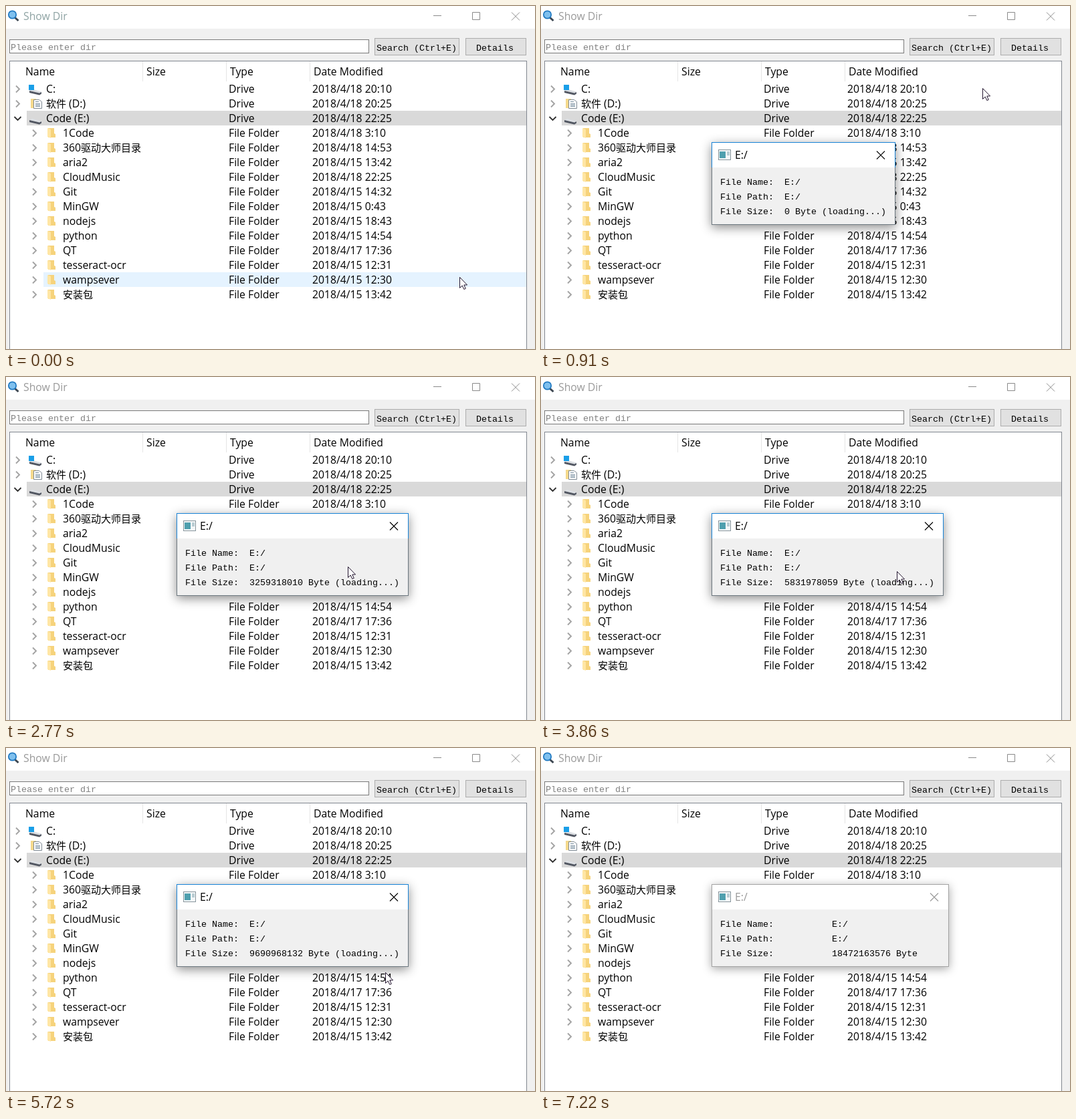
An HTML page that plays this animation: 791x514 px, repeating every 7.37 s.

```html
<!DOCTYPE html>
<html lang="en">
<head>
<meta charset="utf-8">
<title>Show Dir</title>
<style>
html, body { margin: 0; width: 100%; height: 100%; overflow: hidden; background: #f0f0f0; }
svg { display: block; width: 791px; height: 514px; }
text { white-space: pre; }
.ui { font: 15.75px "Open Sans", "Noto Sans", "Noto Sans CJK SC", sans-serif; }
.cjk { font: 15px "Noto Sans CJK SC", "Noto Sans CJK", "Noto Sans CJK JP", sans-serif; }
.mono { font: 13.333px "Liberation Mono", monospace; }
#shade { filter: drop-shadow(0 4px 8px rgba(0, 0, 0, .45)); }
.idle #shade { filter: drop-shadow(0 3px 7px rgba(0, 0, 0, .35)); }
</style>
</head>
<body>
<script>
const LOOP = 7370, TICK = 77;
const NS = 'http://www.w3.org/2000/svg';

function set(el, attrs) {
  for (const k in attrs) el.setAttribute(k, attrs[k]);
  return el;
}
const add = (parent, tag, attrs = {}) =>
  parent.appendChild(set(document.createElementNS(NS, tag), attrs));
const rect = (p, x, y, width, height, fill, more) =>
  add(p, 'rect', { x, y, width, height, fill, ...more });
const frame = (p, x, y, w, h, fill, stroke) =>
  rect(p, x + .5, y + .5, w - 1, h - 1, fill, { stroke });
const path = (p, d, fill, stroke = 'none', width = 1) =>
  add(p, 'path', { d, fill, stroke, 'stroke-width': width });
const group = (p, x, y) => add(p, 'g', { transform: `translate(${x} ${y})` });

function label(p, x, y, str, cls = 'ui', fill = '#000') {
  const el = add(p, 'text', { x, y, class: cls, fill });
  for (const run of str.split(/([\u4e00-\u9fff]+)/).filter(Boolean)) {
    const cjk = /[\u4e00-\u9fff]/.test(run);
    add(el, 'tspan', cjk ? { class: 'cjk' } : {}).textContent = run;
  }
  return el;
}

const svg = add(document.body, 'svg', { viewBox: '0 0 791 514' });
rect(svg, 0, 0, 791, 514, '#f0f0f0');

// title bar
rect(svg, 0, 0, 791, 34, '#fff');
path(svg, 'M13 17L18.5 22', 'none', '#3c4650', 3);
add(svg, 'circle', { cx: 9.5, cy: 13, r: 5.7, fill: '#7fc0ee', stroke: '#1f78c0', 'stroke-width': 1.7 });
const title = label(svg, 26, 21, 'Show Dir');
path(svg, 'M639 14.5H651M756 9.5L768 21.5M768 9.5L756 21.5', 'none', '#8a8a8a');
const maxIcon = path(svg, 'M697.5 9.5H708.5V20.5H697.5Z', 'none');

// search row
frame(svg, 5, 50, 538, 21, '#fff', '#7a7a7a');
label(svg, 7, 66, 'Please enter dir', 'mono', '#808080');
frame(svg, 551, 48, 127, 26, '#e1e1e1', '#adadad');
label(svg, 554, 67, 'Search (Ctrl+E)', 'mono');
const details = frame(svg, 687, 48, 91, 26);
label(svg, 703, 67, 'Details', 'mono');

// file tree
const TOP = 113, ROW = 22, SELECTED = 2, DRIVES = 3;
frame(svg, 5, 82, 774, 440, '#fff', '#828790');
['Name', 'Size', 'Type', 'Date Modified'].forEach((s, i) => {
  label(svg, i ? 85 + 125 * i : 29, 104, s);
  if (i) rect(svg, 79 + 125 * i, 83, 1, 30, '#e5e5e5');
});
rect(svg, 31, TOP + ROW * SELECTED, 747, ROW, '#d9d9d9');
const hover = rect(svg, 56, 0, 722, ROW, '#e5f3ff');

const rows = [
  ['C:', '18 20:10'], ['软件 (D:)', '18 20:25'], ['Code (E:)', '18 22:25'],
  ['1Code', '18 3:10'], ['360驱动大师目录', '18 14:53'], ['aria2', '15 13:42'],
  ['CloudMusic', '18 22:25'], ['Git', '15 14:32'], ['MinGW', '15 0:43'],
  ['nodejs', '15 18:43'], ['python', '15 14:54'], ['QT', '17 17:36'],
  ['tesseract-ocr', '15 12:31'], ['wampsever', '15 12:30'], ['安装包', '15 13:42']
];

function drive(g) {
  path(g, 'M35 14L39 11.5L53 15.5V17L50 18Z', '#dcdfe3');
  path(g, 'M35 14L50 17.5L53 16V18.5L50 20.5L35 17Z', '#525762');
}
function folder(g) {
  path(g, 'M63 4H72V12L74 13V18H63Z', '#f6d37c');
  path(g, 'M62 4L67 6V19L62 17Z', '#ffe6a4');
}
function docFolder(g) {
  path(g, 'M37 4H45V18H37Z', '#f5d98c');
  path(g, 'M41.5 5.5H49.5L53.5 8.5V18.5H41.5Z', '#fff', '#7f8a94');
  path(g, 'M44 8.5H49M44 11.5H51M44 13.5H51M44 15.5H51', 'none', '#6f8799');
}

rows.forEach(([name, date], i) => {
  const g = group(svg, 0, TOP + ROW * i), isDrive = i < DRIVES, x = isDrive ? 15 : 40;
  if (i === SELECTED) path(g, 'M12.5 9L17.5 14L22.5 9', 'none', '#303030', 1.8);
  else path(g, `M${x} 6.5L${x + 5} 11.5L${x} 16.5`, 'none', '#a3a3a3', 1.9);
  (i === 1 ? docFolder : isDrive ? drive : folder)(g);
  if (i === 0) rect(g, 34, 5, 8, 8, '#1a9fe8');
  label(g, isDrive ? 60 : 85, 17, name);
  label(g, 333, 17, isDrive ? 'Drive' : 'File Folder');
  label(g, 458, 17, '2018/4/' + date);
});

// dialog
const dialog = group(svg, 255, 204);
const shade = rect(dialog, 0, 0, 0, 124, '#f0f0f0', { id: 'shade' });
const body = frame(dialog, 0, 0, 1, 124, '#f0f0f0');
const bar = frame(dialog, 0, 0, 1, 38, '#fff');
const barEdge = rect(dialog, 1, 37, 0, 1, '#fff');
frame(dialog, 10, 11, 19, 16, '#f4f7f8', '#87959c');
rect(dialog, 12, 14, 9, 10, '#4f9fae');
rect(dialog, 23, 14, 4, 6, '#b9cdd3');
const dialogTitle = label(dialog, 35, 25, 'E:/');
const cross = path(dialog, 'M-6 13.5L6 25.5M6 13.5L-6 25.5', 'none', '#000', 1.1);
const values = ['Name', 'Path', 'Size'].map((s, i) => {
  label(dialog, 13, 64 + ROW * i, `File ${s}:`, 'mono');
  return label(dialog, 0, 64 + ROW * i, 'E:/', 'mono');
});

const cursor = path(svg, 'M.5 .5V16.5L4.2 13L6.8 18.5L9.3 17.5L6.8 12H11.6Z', '#fff', '#23152f');

// key points of the pointer: time, x, y
const stops = [
  [0, 678, 406], [370, 706, 16], [440, 714, 49], [750, 720, 58], [1290, 511, 284],
  [3550, 511, 284], [3860, 532, 291], [4320, 568, 325], [5570, 566, 327],
  [5720, 567, 336], [6270, 564, 349], [6590, 548, 520], [LOOP, 548, 520]
];

// the recording is jerky, so the path is walked in whole ticks
function pointer(t) {
  const i = stops.findIndex(s => s[0] > t);
  const [t0, x0, y0] = stops[i - 1], [t1, x1, y1] = stops[i];
  const n = Math.max(1, Math.round((t1 - t0) / TICK));
  const k = Math.floor((t - t0) / (t1 - t0) * n) / n;
  return [Math.round(x0 + (x1 - x0) * k), Math.round(y0 + (y1 - y0) * k)];
}

const PRESS = 690, OPEN = 830, COUNT = 2770, DONE = 5800, BLUR = 7220;

function bytes(t) {
  if (t < COUNT) return 0;
  if (t >= DONE) return 18472163576;
  return Math.round(5831978059 + 3858990073 / 6 * Math.floor((t - 3860) / 310));
}

function draw(t) {
  const [x, y] = pointer(t);
  set(cursor, { transform: `translate(${x} ${y})` });

  const row = Math.floor((y - TOP) / ROW), left = row < DRIVES ? 31 : 56;
  const lit = (t < OPEN || t >= DONE) && row in rows && row !== SELECTED;
  set(hover, { x: left, y: TOP + ROW * row, width: 778 - left, visibility: lit ? 'visible' : 'hidden' });

  const pressed = t >= PRESS && t < PRESS + TICK;
  set(title, { fill: pressed ? '#000' : t < PRESS ? '#8ea3a3' : '#999' });
  set(maxIcon, { stroke: t >= 370 && t < 520 ? '#cfcfcf' : '#8a8a8a' });
  set(details, pressed ? { fill: '#cce4f7', stroke: '#005499' }
    : t >= 520 && t < OPEN ? { fill: '#e5f1fb', stroke: '#0078d7' }
    : { fill: '#e1e1e1', stroke: '#adadad' });

  const done = t >= DONE, idle = t >= BLUR, ink = idle ? '#999' : '#000';
  const w = done ? 355 : t >= COUNT ? 347 : 275;
  set(dialog, { visibility: t >= OPEN ? 'visible' : 'hidden', class: idle ? 'idle' : '' });
  set(shade, { width: w });
  set(body, { width: w - 1, stroke: idle ? '#a3a3a3' : '#6d7880' });
  set(bar, { width: w - 1, stroke: idle ? '#a3a3a3' : '#1883d7' });
  set(barEdge, { width: w - 2 });
  set(cross, { transform: `translate(${w - 22} 0)`, stroke: ink });
  set(dialogTitle, { fill: ink });
  values.forEach(v => set(v, { x: done ? 180 : 109 }));
  values[2].firstChild.textContent = bytes(t) + ' Byte' + (done ? '' : ' (loading...)');
}

const start = performance.now();
function tick() {
  draw((performance.now() - start) % LOOP);
  requestAnimationFrame(tick);
}
tick();
</script>
</body>
</html>
```
